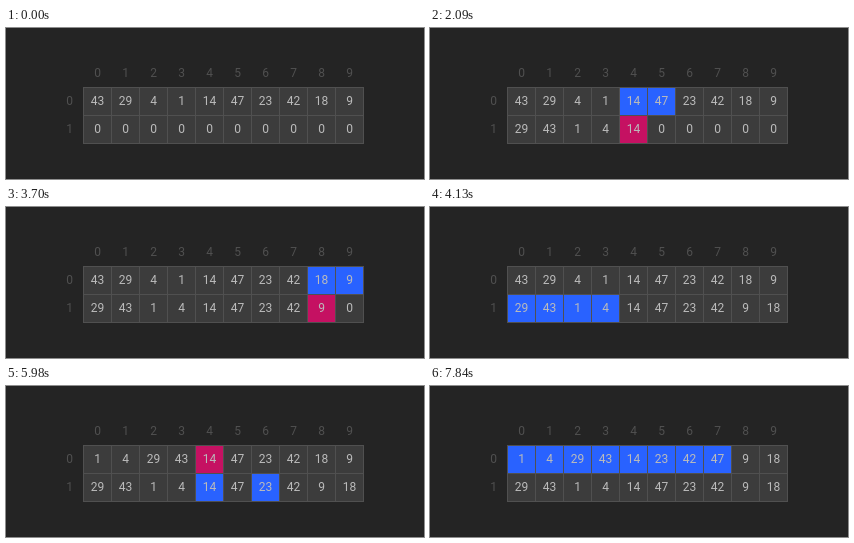
These frames come from a looping animation (418x151 px, 8000 ms). An HTML page:

```html
<!DOCTYPE html>
<html lang="en">
<head>
<meta charset="utf-8">
<title>Bottom-up merge sort</title>
<style>
html, body { margin: 0; width: 100%; height: 100%; overflow: hidden; background: #242424; }
body { position: relative; font: 12px/27px Roboto, sans-serif; color: #bbb; }
div { position: absolute; width: 27px; height: 27px; text-align: center; }
#grid { left: 77px; top: 59px; width: 281px; height: 57px; background: #505050; }
.index { color: #505050; }
.cell { background: #3c3c3c; }
.selected { background: #2962ff; }
.patched { background: #c51162; }
</style>
</head>
<body>
<div id="grid"></div>
<script>
const LOOP = 8000;
const TIMES = [0, 40, 420, 630, 830, 1270, 1440, 1660, 2090, 2300, 2500, 2910,
  3110, 3290, 3700, 3900, 4130, 4320, 4530, 4730, 4960, 5160, 5370, 5570, 5780,
  5980, 6160, 6370, 6580, 6790, 7000, 7230, 7430, 7640, 7840];
const start = [43, 29, 4, 1, 14, 47, 23, 42, 18, 9];
const N = start.length;
const data = [start, Array(N).fill(0)];
const steps = [];

// Cells are numbered row by row, so row r, column c is r * N + c.
function record(selected = [], patched = -1) {
  steps.push({ values: data.flat(), selected, patched });
}

function merge(row, left, mid, end) {
  const src = data[row], out = 1 - row, base = row * N;
  let i = left, j = mid;
  record(Array.from({ length: end - left }, (_, k) => base + left + k));
  for (let k = left; k < end; k++) {
    const both = i < mid && j < end;
    const heads = [];
    if (i < mid) heads.push(base + i);
    if (j < end) heads.push(base + j);
    // In a pair the compared cells are the whole range, already selected.
    if (both && end - left > 2) record(heads);
    const takeLeft = i < mid && (j >= end || src[i] <= src[j]);
    data[out][k] = src[takeLeft ? i++ : j++];
    // With one run left, only the cell being copied is selected.
    record(both ? heads : heads.slice(0, 1), out * N + k);
  }
}

record();
for (let width = 1, row = 0; width < N; width *= 2, row = 1 - row)
  for (let i = 0; i < N; i += 2 * width)
    merge(row, i, Math.min(i + width, N), Math.min(i + 2 * width, N));

function add(row, col, className, text = "") {
  const el = document.createElement("div");
  el.className = className;
  el.textContent = text;
  el.style.left = 78 + 28 * col + "px";
  el.style.top = 60 + 28 * row + "px";
  document.body.append(el);
  return el;
}

for (let c = 0; c < N; c++) add(-1, c, "index", c);
for (let r = 0; r < 2; r++) add(r, -1, "index", r);
const cells = data.flat().map((_, k) => add(Math.floor(k / N), k % N, "cell"));

let shown = -1;
function draw(now) {
  const t = now % LOOP;
  const index = TIMES.filter(time => time <= t).length - 1;
  if (index !== shown) {
    const { values, selected, patched } = steps[shown = index];
    cells.forEach((el, k) => {
      el.textContent = values[k];
      el.className = "cell" + (k === patched ? " patched" : selected.includes(k) ? " selected" : "");
    });
  }
}

const origin = performance.now();
function tick() {
  draw(performance.now() - origin);
  requestAnimationFrame(tick);
}
tick();
</script>
</body>
</html>
```
